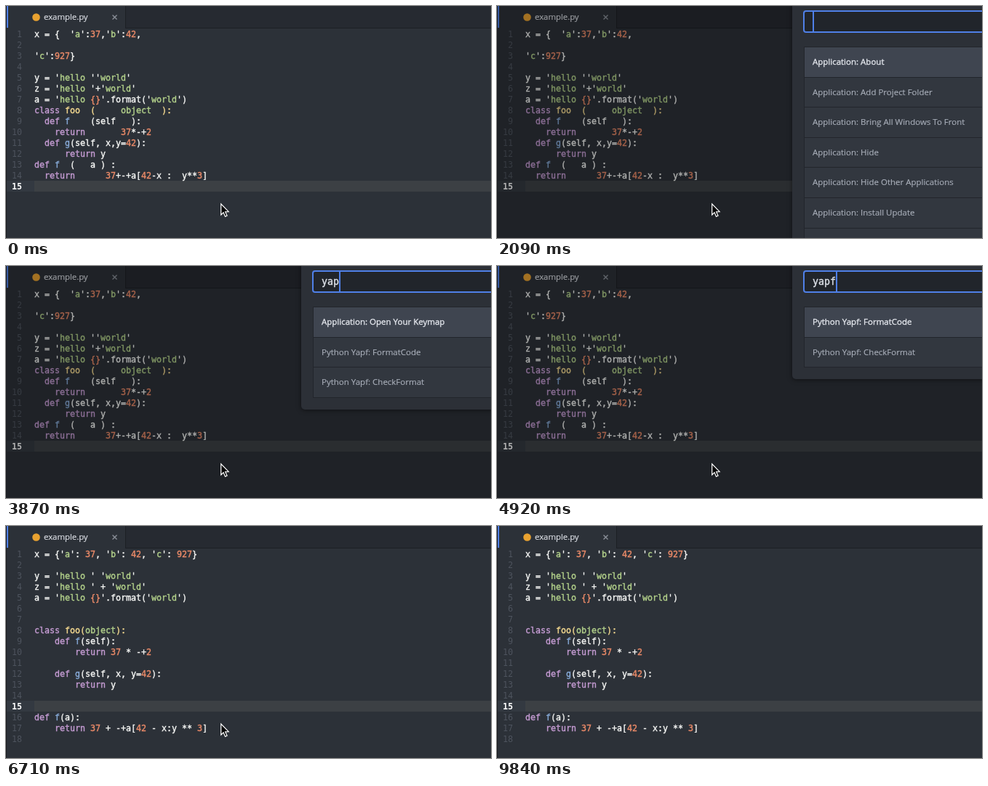
Recreate the animation shown at these times as an HTML page with a canvas. Size 667 by 320 pixels, loop 9.94 s.

```html
<!DOCTYPE html>
<html lang="en">
<head>
<meta charset="utf-8">
<title>Code formatting</title>
<style>
html, body { margin: 0; width: 100%; height: 100%; overflow: hidden; background: #2c3138; }
canvas { display: block; width: 667px; height: 320px; }
</style>
</head>
<body>
<canvas id="stage" width="667" height="320"></canvas>
<script>
const W = 667, H = 320, LOOP = 9940;
const g = document.getElementById('stage').getContext('2d');
const MONO = '"DejaVu Sans Mono", monospace';
const UI = '11.5px "Open Sans", "Noto Sans", sans-serif';
const COL = 7, LINE = 15, LEFT = 39, TOP = 31;

const ink = {
  plain: '#f5f6f4', string: '#b2d08a', number: '#ea8a68',
  keyword: '#c49bd2', type: '#f3d88f', func: '#86a9d6',
  gutter: '#4d535d', blue: '#4f80e8'
};

const messy = `x = {  'a':37,'b':42,

'c':927}

y = 'hello ''world'
z = 'hello '+'world'
a = 'hello {}'.format('world')
class foo  (     object  ):
  def f    (self   ):
    return       37*-+2
  def g(self, x,y=42):
      return y
def f  (   a ) :
  return      37+-+a[42-x :  y**3]
`.split('\n');

const tidy = `x = {'a': 37, 'b': 42, 'c': 927}

y = 'hello ' 'world'
z = 'hello ' + 'world'
a = 'hello {}'.format('world')


class foo(object):
    def f(self):
        return 37 * -+2

    def g(self, x, y=42):
        return y


def f(a):
    return 37 + -+a[42 - x:y ** 3]
`.split('\n');

const app = names => names.map(n => 'Application: ' + n);
const yapf = ['Python Yapf: FormatCode', 'Python Yapf: CheckFormat'];
const keymap = app(['Open Your Keymap']);
const lists = {
  all: app(['About', 'Add Project Folder', 'Bring All Windows To Front', 'Hide',
    'Hide Other Applications', 'Install Update', '']),
  y: app(['Open Your Config', 'Open Your Init Script', 'Open Your Keymap',
    'Open Your Snippets', 'Open Your Stylesheet']).concat('Editor: Copy Path', ''),
  ya: keymap.concat(yapf, 'Editor: Copy Path', 'Tree View: Copy Full Path',
    'Tree View: Copy Project Path', ''),
  yap: keymap.concat(yapf),
  yapf
};

// [start, typed text, list, caret shown]
const palette = [
  [2090, '', 'all', 1], [2530, '', 'all', 0], [2980, '', 'all', 1],
  [3130, 'y', 'all', 1], [3270, 'y', 'y', 1], [3420, 'ya', 'y', 1],
  [3570, 'ya', 'ya', 1], [3870, 'yap', 'yap', 1], [4020, 'yapf', 'yapf', 1],
  [4470, 'yapf', 'yapf', 0], [4920, 'yapf', 'yapf', 1]
];

// Spans of time in which the editor caret is lit
const caretOn = [[450, 740], [1190, 1640], [5360, 5660], [6110, 6710],
  [7010, 7450], [7900, 8200], [8650, 9100], [9390, 9840]];

function rect(x, y, w, h, color) {
  g.fillStyle = color;
  g.fillRect(x, y, w, h);
}

function text(s, x, y, font, color, weight = 0) {
  g.font = font;
  g.fillStyle = color;
  g.fillText(s, x, y);
  if (weight) {
    g.strokeStyle = color;
    g.lineWidth = weight;
    g.strokeText(s, x, y);
  }
}

function tokens(line) {
  const out = [];
  const re = /'[^']*'|[A-Za-z_]\w*|\d+|\s+|./g;
  let prev = '';
  for (const [word] of line.matchAll(re)) {
    if (!word.trim()) { out.push([word, 'plain']); continue; }
    if (word[0] === "'") {
      out.push(["'", 'plain']);
      for (const part of word.slice(1, -1).split(/(\{\})/))
        out.push([part, part === '{}' ? 'number' : 'string']);
      out.push(["'", 'plain']);
    } else {
      let kind = 'plain';
      if (/^(class|def|return)$/.test(word)) kind = 'keyword';
      else if (/^\d/.test(word)) kind = 'number';
      else if (prev === 'def') kind = 'func';
      else if (word === 'object') kind = 'string';
      else if (/^class/.test(line)) kind = 'type';
      out.push([word, kind]);
    }
    prev = word;
  }
  return out;
}

const parsed = new Map([messy, tidy].map(doc => [doc, doc.map(tokens)]));

function tabBar() {
  rect(164, 0, W - 164, 30, '#262a31');
  rect(164, 0, 1, 30, '#1c1f24');
  rect(164, 30, W - 164, 1, '#1c1f24');
  rect(1, 0, 2, 30, ink.blue);
  g.fillStyle = '#e9a230';
  g.beginPath();
  g.arc(41.5, 15.5, 5.3, 0, 7);
  g.fill();
  text('example.py', 52, 19, UI.replace('11.5', '11.35'), '#d9dce2', .2);
  g.strokeStyle = '#8b9099';
  g.lineWidth = 1.4;
  g.beginPath();
  g.moveTo(146.5, 12.5); g.lineTo(152.5, 18.5);
  g.moveTo(152.5, 12.5); g.lineTo(146.5, 18.5);
  g.stroke();
}

function editor(doc, caret) {
  rect(0, 0, W, H, '#2c3138');
  tabBar();
  const active = TOP + 14 * LINE;
  rect(1, active, LEFT - 1, LINE, '#333941');
  rect(LEFT, active, W - LEFT, LINE, '#3c4044');
  const font = '11.63px ' + MONO;
  parsed.get(doc).forEach((line, i) => {
    const y = TOP + 12 + i * LINE, n = String(i + 1);
    const on = i === 14;
    text(n, 22 - n.length * COL, y, (on ? 'bold ' : '') + font, on ? '#ffffff' : ink.gutter);
    let x = LEFT;
    for (const [word, kind] of line) {
      text(word, x, y, font, ink[kind], .4);
      x += word.length * COL;
    }
  });
  if (caret) rect(LEFT, active, 1, LINE, '#ffffff');
}

function box(x, y, w, h, r) {
  g.beginPath();
  g.roundRect(x, y, w, h, r);
}

function drawPalette([, typed, key, caret]) {
  const rows = lists[key], step = 41.6, first = 56;
  const end = Math.round(first + rows.length * step);
  rect(0, 0, W, H, 'rgba(0,0,0,.3)');

  g.save();
  g.shadowColor = 'rgba(0,0,0,.5)';
  g.shadowBlur = 6;
  g.shadowOffsetY = 1;
  g.fillStyle = '#2c3037';
  box(406, -20, W, end + 37, 5);
  g.fill();
  g.restore();

  g.fillStyle = '#21252b';
  box(422, 7, W, 29, 3);
  g.fill();
  g.strokeStyle = ink.blue;
  g.lineWidth = 2;
  g.stroke();
  text(typed, 434, 26, '13.29px ' + MONO, '#dce0e8', .4);
  if (caret) rect(434 + typed.length * 8, 8, 2, 27, ink.blue);

  rows.forEach((name, i) => {
    const y = Math.round(first + i * step);
    const h = Math.round(first + (i + 1) * step) - y;
    rect(422, y, W, h, i ? '#32373f' : '#3f4550');
    rect(422, y, W, 1, '#22252b');
    text(name, 434, y + 25, UI, i ? '#a9afba' : '#e3e6ec', i ? .15 : .35);
  });
  rect(422, first, 1, end - first, '#22252b');
  rect(422, end, W, 1, '#22252b');
}

function pointer(alpha) {
  const pts = [[0, 0], [0, 15], [3.4, 11.8], [5.8, 17.4], [8.3, 16.3], [5.9, 10.9], [10.4, 10.7]];
  g.save();
  g.globalAlpha = alpha;
  g.translate(295.7, 273);
  g.beginPath();
  pts.forEach(p => g.lineTo(...p));
  g.closePath();
  g.fillStyle = '#000';
  g.fill();
  g.strokeStyle = '#fff';
  g.lineWidth = 1.2;
  g.stroke();
  g.restore();
}

function draw(t) {
  editor(t < 6110 ? messy : tidy, caretOn.some(([a, b]) => t >= a && t < b));
  if (t >= 2090 && t < 5360) drawPalette(palette.findLast(s => t >= s[0]));
  rect(0, 0, 1, H, '#17191d');
  if (t < 8950) pointer(t < 8800 ? 1 : .45);
}

const start = performance.now();
function frame(now) {
  draw(Math.max(0, now - start) % LOOP);
  requestAnimationFrame(frame);
}
draw(0);
requestAnimationFrame(frame);
</script>
</body>
</html>
```
